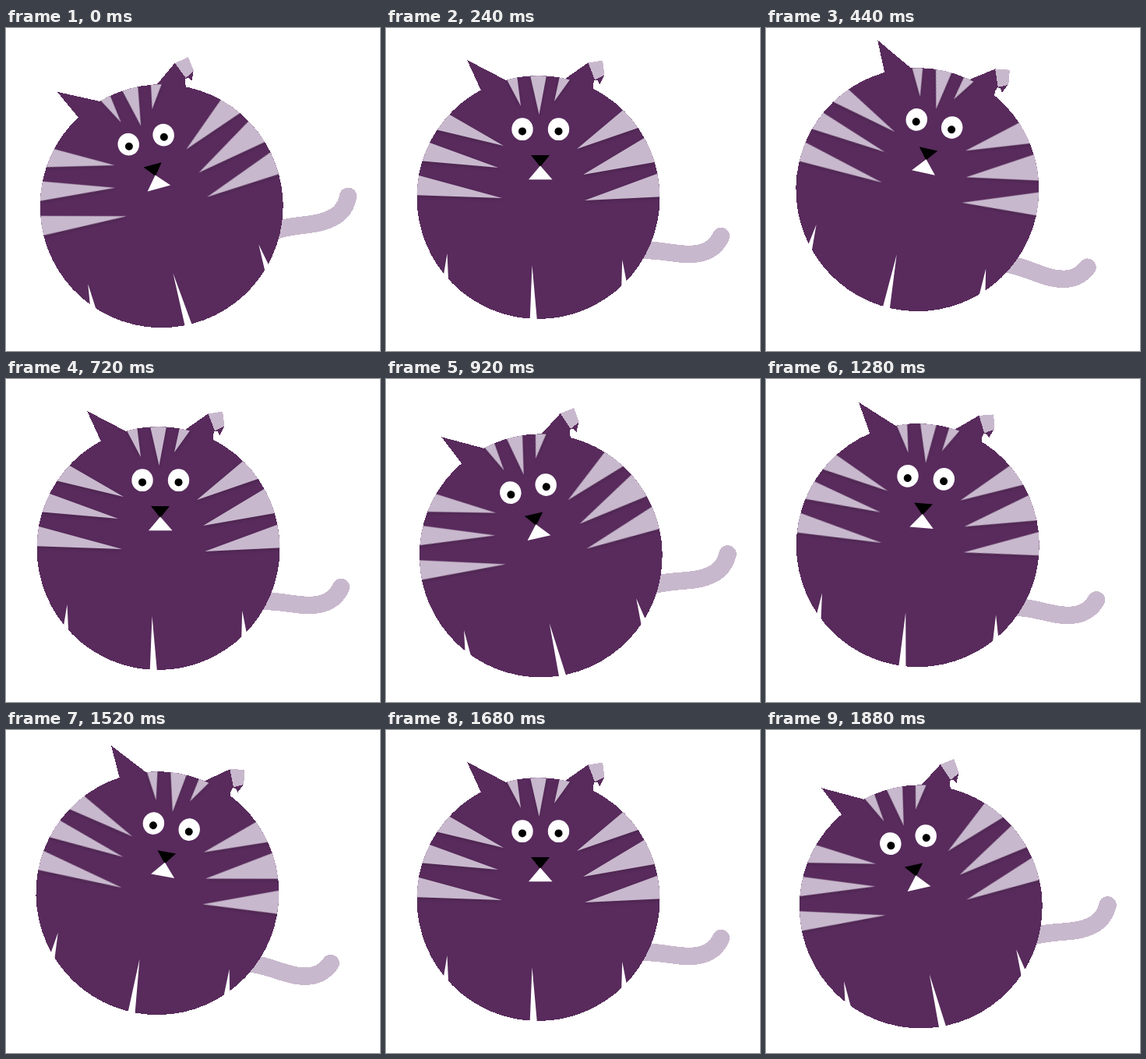
These frames come from a looping animation (480 px wide and 414 px high, 1920 ms). An HTML page:

```html
<!DOCTYPE html>
<html lang="en">
<head>
<meta charset="utf-8">
<title>Rocking cat</title>
<style>
  html, body { margin: 0; width: 100%; height: 100%; overflow: hidden; background: #fff; }
  svg { display: block; width: 480px; height: 414px; }
  .fur { fill: #582b5c; }
  .pale { fill: #c8b8cd; }
  .white { fill: #fff; }
  .tail { fill: none; stroke: #c8b8cd; stroke-width: 22.5; stroke-linecap: round; }
  .crisp { shape-rendering: crispEdges; }
  #stripes { filter: drop-shadow(0 2px 2px rgba(0, 0, 0, .15)); }
</style>
</head>
<body>
<svg viewBox="0 0 480 414">
  <defs>
    <circle id="ball" class="crisp" cx="195.5" cy="217" r="156"/>
    <clipPath id="round"><use href="#ball"/></clipPath>
    <g id="eye">
      <ellipse class="white" cx="175" cy="129.7" rx="13.7" ry="14.4"/>
      <circle cx="175" cy="132.4" r="5"/>
    </g>
  </defs>
  <g id="cat">
    <path class="tail crisp" d="M318 286C345 282 368 290 388 290C408 290 422 284 430 267"/>
    <g class="fur crisp">
      <path d="M104 41L156 68L170 100L140 100L121.5 79Z"/>
      <path d="M230 65L260 44L268 66L265.5 72L266 82L240 90Z"/>
      <path d="M267 67L280 60.5L274.5 72L271.5 67.5Z"/>
      <use href="#ball"/>
    </g>
    <path class="pale crisp" d="M259.5 44.5L278 41.5L280.5 60.5L268 66.5Z"/>
    <g clip-path="url(#round)"><path id="stripes" class="pale"/></g>
    <path id="legs" class="white"/>
    <use href="#eye"/>
    <use href="#eye" x="46.5"/>
    <path d="M186 163H210L198 178Z"/>
    <path class="white" d="M198 176.5L183 194.3H213.5Z"/>
  </g>
</svg>
<script>
  const get = id => document.getElementById(id);

  // Point on the body's rim, in degrees clockwise from the top.
  function rim(degrees) {
    const a = degrees * Math.PI / 180;
    return [195.5 + 156 * Math.sin(a), 217 - 156 * Math.cos(a)];
  }

  // Evenly spaced wedges from inner tips to just past the rim; swell widens the middle one.
  function fan(tips, first, step, width, swell = 0) {
    return tips.map((tip, i) => {
      const half = (width + (i === 1 ? swell : 0)) / 2;
      const ends = [-half, half].map(side =>
        rim(first + i * step + side).map((v, axis) => tip[axis] + (v - tip[axis]) * 1.25));
      return `M${tip}L${ends[0]}L${ends[1]}Z`;
    }).join('');
  }

  get('stripes').setAttribute('d',
    fan([[173, 100], [196.5, 111], [216, 94]], -12.5, 12.5, 5, 2.6) +
    fan([[151, 151], [144, 179], [149, 218]], -51.7, -16.3, 9.3) +
    fan([[245, 155], [253, 188], [255, 221]], 49.7, 17.3, 11, 1.4));
  get('legs').setAttribute('d',
    fan([[78.5, 289], [187.5, 304], [303.2, 297]], 229.4, -47.1, 3.3));

  // A steady swing between -TILT and TILT, advancing once per STEP.
  const SWING = 960, STEP = 40, TILT = 15;
  const start = performance.now();

  function draw() {
    const elapsed = Math.max(0, performance.now() - start);
    const phase = Math.floor(elapsed / STEP) * STEP % SWING / SWING;
    const angle = TILT * (1 - 4 * Math.abs(phase - 0.5));
    get('cat').setAttribute('transform', `rotate(${angle} 240 207)`);
    requestAnimationFrame(draw);
  }
  draw();
</script>
</body>
</html>
```
